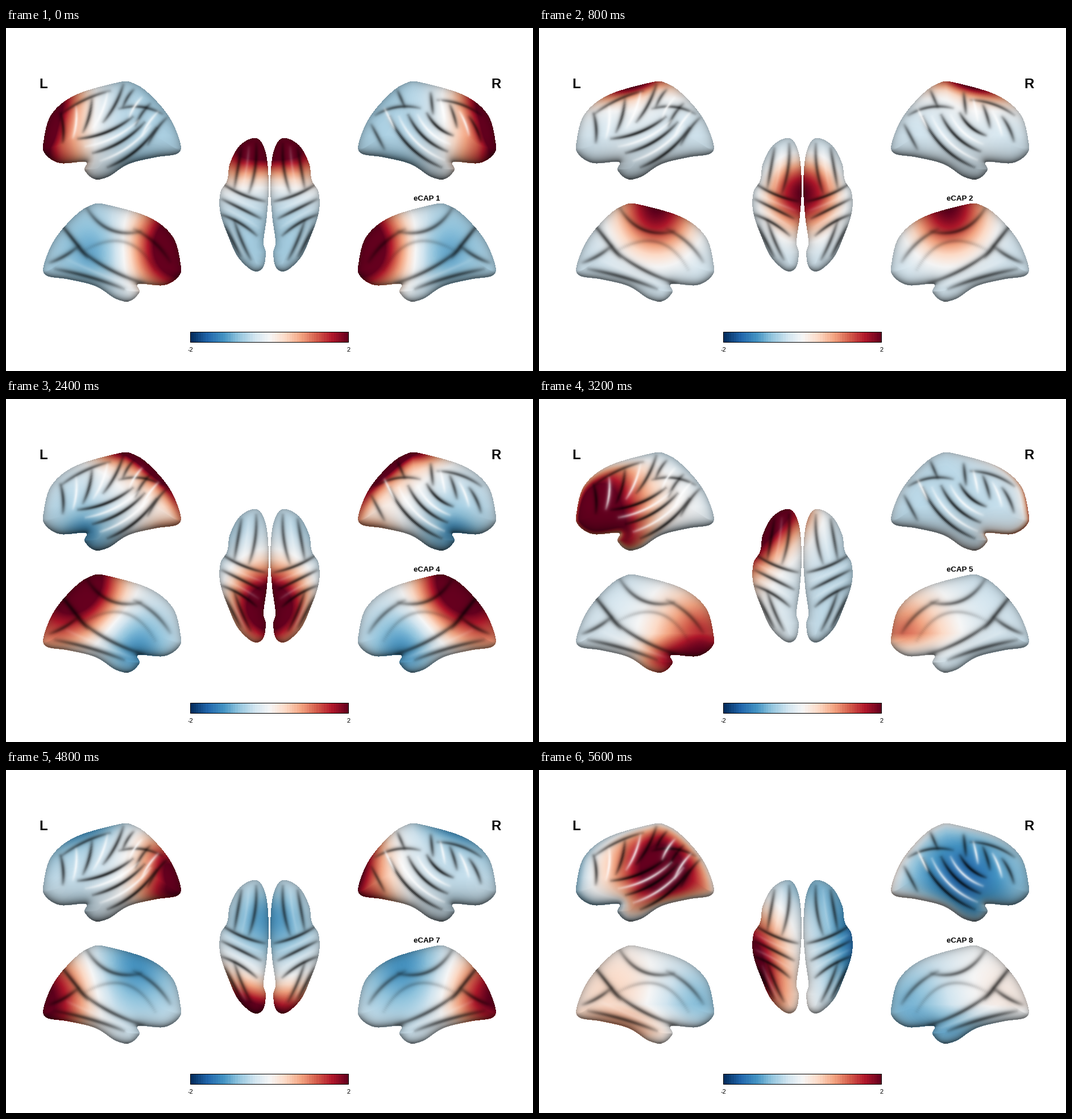
A matplotlib script for the animation above (6.4 s loop, 927 px wide and 604 px high).

```python
import numpy as np
import matplotlib.pyplot as plt
from matplotlib.animation import FuncAnimation
from matplotlib.patches import Rectangle
from matplotlib.path import Path

W, H, DPI = 927, 604, 64
PX = 72 / DPI
CMAP = plt.get_cmap("RdBu_r")

# Key points of the left hemisphere, seen from the side and from above.
SIDE = [(66, 200), (80, 152), (122, 118), (196, 96), (221, 96), (250, 114),
        (286, 155), (306, 200), (302, 221), (262, 228), (215, 240), (180, 262),
        (155, 266), (138, 250), (140, 236), (95, 238), (69, 222)]
TOP = [(441, 194), (412, 206), (394, 238), (389, 268), (377, 290), (377, 326),
       (393, 372), (409, 405), (435, 428), (452, 422), (457, 396), (453, 376),
       (459, 330), (462, 275), (457, 220)]


def spline(points, n=20):
    """Closed Catmull-Rom curve."""
    b = np.array(points, float)[:, None]
    a, c, d = (np.roll(b, s, axis=0) for s in (1, -1, -2))
    t = np.linspace(0, 1, n, endpoint=False)[None, :, None]
    r = .5 * (2 * b + (c - a) * t + (2 * a - 5 * b + 4 * c - d) * t ** 2
              + (3 * b - a - 3 * c + d) * t ** 3)
    return r.reshape(-1, 2)


def stroke(arc, X, Y, width):
    """Soft arc from end to end, bent sideways and fading at its ends."""
    x0, y0, x1, y1, bend = arc
    t = np.linspace(0, 1, 50)
    bow = 2 * bend * t * (1 - t)
    xs = x0 + (x1 - x0) * t - (y1 - y0) * bow
    ys = y0 + (y1 - y0) * t + (x1 - x0) * bow
    taper = np.sqrt(np.sin(np.pi * (.04 + .92 * t)))
    out = np.zeros_like(X)
    for x, y, k in zip(xs, ys, taper):
        out = np.maximum(out, k / (1 + ((X - x) ** 2 + (Y - y) ** 2) / width ** 2) ** 2)
    return out


def family(n, depth, first, last=None):
    """Parallel grooves blended from first to last, with crests between them."""
    grooves = np.linspace(first, last or first, n)
    crests = (grooves[1:] + grooves[:-1]) / 2
    return depth, grooves, crests


LEFT = [family(3, .7, (128, 196, 222, 158, .15), (180, 246, 264, 178, .15)),
        family(3, .6, (206, 102, 172, 166, -.1), (96, 152, 100, 202, -.1)),
        family(1, .5, (98, 152, 182, 112, -.1)),
        family(1, .5, (200, 143, 274, 152, -.2)),
        family(3, .5, (224, 110, 206, 140, .1), (282, 160, 250, 206, .1))]
RIGHT = [family(3, .7, (186, 152, 142, 190, -.2), (252, 158, 162, 246, -.2)),
         family(3, .55, (180, 116, 176, 152, 0), (112, 158, 92, 200, .1)),
         family(1, .5, (92, 154, 167, 128, -.15)),
         family(1, .5, (200, 142, 276, 154, -.2)),
         family(2, .5, (238, 112, 226, 140, 0), (284, 172, 262, 214, 0))]
INNER = [family(1, .5, (142, 318, 236, 360, .35)),
         family(1, .4, (226, 356, 288, 412, -.15)),
         family(1, .6, (96, 346, 142, 404, 0)),
         family(1, .5, (126, 386, 78, 414, -.1)),
         family(2, .55, (128, 390, 240, 450, .1), (88, 426, 206, 460, -.05)),
         family(1, .2, (140, 392, 262, 426, -.5))]
ABOVE = [family(2, .55, (440, 206, 428, 290, -.1), (414, 214, 402, 282, 0)),
         family(3, .6, (382, 276, 454, 306, .1), (380, 330, 440, 366, -.1)),
         family(2, .55, (402, 342, 430, 408, .05), (385, 350, 412, 402, 0))]

# Activity: base level, then blobs (height, x, a, z, spread) with x across from
# left to right, a from front to back, z from top to bottom.
frontal = (-.6, [(2.5, -.5, 0, .45, .24), (2.5, .5, 0, .45, .24),
                 (-.5, 0, .62, .5, .15)])
central = (-.4, [(2.4, 0, .42, .05, .2)])
right_temporal = (-.8, [(3.4, .9, .72, .6, .26), (.6, -.3, 1, .6, .25)])
parietal = (-.3, [(3.2, 0, .75, .05, .22), (.9, 0, 1, .65, .2),
                  (-.8, -.5, .33, .75, .18), (-.8, .5, .33, .75, .18)])
right_frontal = (-.55, [(3, .95, .14, .55, .27), (.9, .3, .05, .65, .15),
                        (.9, .5, .37, .9, .14), (.4, .8, .85, .55, .25)])
left_frontal = (-.55, [(k, -x, *rest) for k, x, *rest in right_frontal[1]])
occipital = (-.4, [(2.6, -.6, 1, .55, .24), (1.5, .6, 1, .55, .22),
                   (-.8, 0, .33, .2, .2)])
left_temporal = (-.1, [(2.2, -1, .6, .42, .24), (.7, -.7, .8, .7, .3),
                       (-.5, 0, .08, .6, .18), (-1.5, 1, .5, .6, .33)])
STATES = [frontal, central, right_temporal, parietal,
          left_frontal, right_frontal, occipital, left_temporal]


def activity(state, x, a, z):
    base, blobs = state
    v = np.full_like(a, base)
    for k, bx, ba, bz, s in blobs:
        r2 = ((x - bx) / 2.6) ** 2 + (a - ba) ** 2 + ((z - bz) / 1.6) ** 2
        v += k * np.exp(-r2 / (2 * s * s))
    return v


class View:
    """Lit relief of one view, kept in the coordinates of the left half."""

    def __init__(self, outline, families, width, gloss):
        edge = spline(outline)
        self.x0, self.y0 = np.floor(edge.min(0)).astype(int)
        self.x1, self.y1 = np.ceil(edge.max(0)).astype(int)
        X, Y = np.meshgrid(np.arange(self.x0, self.x1) + .5,
                           np.arange(self.y0, self.y1) + .5)
        inside = Path(edge).contains_points(np.c_[X.ravel(), Y.ravel()])
        self.mask = inside.reshape(X.shape)
        d2 = np.full_like(X, 1e9)
        for x, y in edge:
            d2 = np.minimum(d2, (X - x) ** 2 + (Y - y) ** 2)
        self.depth = np.sqrt(d2)

        floor, dull = np.ones_like(X), np.ones_like(X)
        for k, grooves, crests in families:
            for arc in grooves:
                floor *= 1 - k * stroke(arc, X, Y, width)
            for arc in crests:
                dull *= 1 - gloss * stroke(arc, X, Y, width * .8)

        # Light falls from above, so lower rims and slopes lie in shadow.
        down = np.clip(-np.gradient(self.depth, axis=0), 0, 1)
        rim = (.25 + .45 * down) * np.exp(-self.depth / 8)
        slope = 1.5 * np.gradient(floor, axis=0)
        self.shade = np.clip(floor + slope, .2, 1.1) * (1 - rim)
        self.glow = (1 - dull) * (1 - np.exp(-self.depth / 5))
        self.X, self.Y = X, Y

    def place(self, x, a, z):
        self.pos = x, a, z
        return self

    def paint(self, canvas, state, side):
        x, a, z = self.pos
        v = activity(state, side * x, a, z)
        rgb = CMAP(np.clip(v / 4 + .5, 0, 1))[..., :3] * self.shade[..., None]
        rgb = np.clip(rgb, 0, 1)
        rgb += (1 - rgb) * self.glow[..., None]
        mask, left = self.mask, self.x0
        if side > 0:
            rgb, mask, left = rgb[:, ::-1], mask[:, ::-1], W - self.x1
        part = canvas[self.y0:self.y1, left:left + mask.shape[1]]
        part[mask] = rgb[mask]


def outer(families):
    view = View(SIDE, families, 5, .75)
    z = (view.Y - 95) / 171
    view.shade *= 1 - .25 * np.clip((z - .55) / .45, 0, 1)
    return view.place(1 - np.exp(-view.depth / 18), (view.X - 66) / 241, z)


def inner():
    view = View([(373 - x, y + 215) for x, y in SIDE], INNER, 6, .2)
    z = (view.Y - 310) / 171
    under = np.clip((z - .6) / .3, 0, 1)
    return view.place(.05 + .4 * under, (307 - view.X) / 241, z)


def above():
    view = View(TOP, ABOVE, 5, .2)
    x = (463.5 - view.X) / 87
    a = (view.Y - 194) / 234
    return view.place(x, a, 2.2 * (a - .52) ** 2 + .4 * np.abs(x) ** 2.5)


medial, dorsal = inner(), above()
VIEWS = [(outer(LEFT), -1), (outer(RIGHT), 1),
         (medial, -1), (medial, 1), (dorsal, -1), (dorsal, 1)]


def picture(state):
    canvas = np.ones((H, W, 3))
    for view, side in VIEWS:
        view.paint(canvas, state, side)
    steps = np.floor(np.linspace(0, 63.99, 278)) / 63
    canvas[535:553, 325:603] = CMAP(steps)[:, :3]
    return canvas


pictures = [picture(s) for s in STATES]

fig = plt.figure(figsize=(W / DPI, H / DPI), dpi=DPI, facecolor="white")
ax = fig.add_axes([0, 0, 1, 1])
ax.axis("off")
image = ax.imshow(pictures[0], extent=(0, W, H, 0), aspect="auto",
                  interpolation="nearest")
ax.set(xlim=(0, W), ylim=(H, 0))
ax.add_patch(Rectangle((324.5, 534.5), 278, 18, fill=False, ec="black", lw=PX))


def label(x, y, text, size, weight="normal"):
    return ax.text(x, y, text, fontsize=size * PX, weight=weight, color="black",
                   family="Liberation Sans", ha="center", va="baseline")


label(66, 106, "L", 24, "bold")
label(862, 106, "R", 24, "bold")
label(324, 570, "-2", 11)
label(602.5, 570, "2", 11)
title = label(740, 304, "eCAP 1", 13.33, "bold")


def update(i):
    image.set_data(pictures[i])
    title.set_text(f"eCAP {i + 1}")
    return image, title


anim = FuncAnimation(fig, update, frames=len(STATES), interval=800,
                     repeat=True, repeat_delay=0)
plt.show()
```
